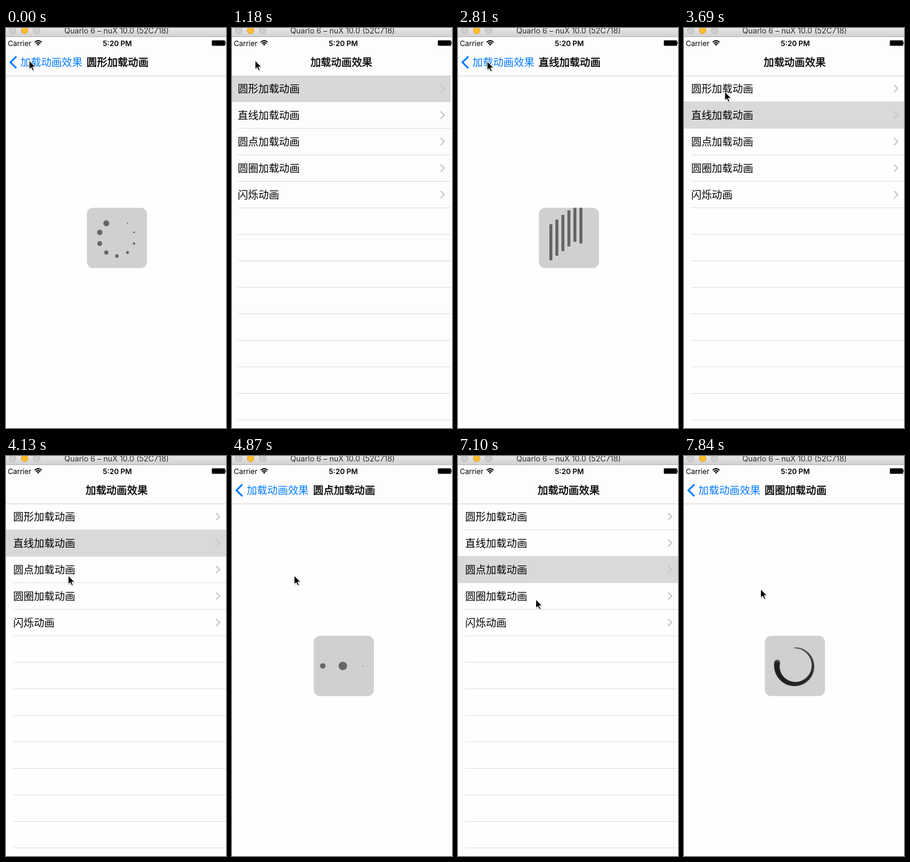
These frames come from a looping animation (366 by 664 pixels, 7990 ms). An HTML page:

```html
<!DOCTYPE html>
<html lang="zh-CN">
<head>
<meta charset="utf-8">
<title>加载动画效果</title>
<style>
  html, body { margin: 0; width: 100%; height: 100%; overflow: hidden; background: #fefefe; }
  svg { display: block; width: 100%; height: 100%; }
  text { font: 12px Inter, sans-serif; }
  .cjk { font: 17.2px "Noto Sans CJK SC", "Noto Sans CJK", sans-serif; }
  .medium { stroke: #000; stroke-width: .45; }
  .bold { font-weight: 600; }
  .blue { fill: #007aff; }
</style>
</head>
<body>
<svg viewBox="0 0 366 664">
  <defs>
    <linearGradient id="chrome" x2="0" y2="1">
      <stop stop-color="#e6e6e6"/><stop offset="1" stop-color="#d1d1d1"/>
    </linearGradient>
    <linearGradient id="edge">
      <stop stop-color="#000" stop-opacity="0"/><stop offset="1" stop-color="#000" stop-opacity=".11"/>
    </linearGradient>
    <clipPath id="cardClip"><rect x="134.5" y="298.5" width="100" height="100" rx="10"/></clipPath>
  </defs>

  <g id="list">
    <rect x="-3" y="80" width="375" height="584" fill="#fefefe"/>
    <g id="rows"></g>
    <rect id="dim" x="-3" y="80" width="375" height="584"/>
  </g>

  <g id="page">
    <rect id="shadow" x="-12" y="80" width="9" height="584" fill="url(#edge)"/>
    <rect x="-3" y="80" width="375" height="584" fill="#fefefe"/>
    <rect x="134.5" y="298.5" width="100" height="100" rx="10" fill="#d0d0d0"/>
    <g id="loaders" clip-path="url(#cardClip)" fill="#666"></g>
  </g>

  <rect y="15" width="366" height="64" fill="#fdfdfd"/>
  <path d="M0 79.5H366" stroke="#d2d2d2"/>
  <path id="back" d="M17.2 47.2L7.4 57L17.2 66.8" fill="none" stroke="#007aff" stroke-width="3"/>
  <text id="backLabel" class="cjk blue" y="63.3">加载动画效果</text>
  <text id="listTitle" class="cjk medium" y="63.3">加载动画效果</text>
  <text id="pageTitle" class="cjk medium" y="63.3"></text>

  <rect width="366" height="14" fill="url(#chrome)"/>
  <path d="M0 14.5H366" stroke="#b4b4b4"/>
  <g stroke="#b3b3b3" fill="#cfcfcf">
    <circle cx="11" cy="4" r="5.5"/>
    <circle cx="31" cy="4" r="5.5" fill="#ffbd2e" stroke="#e0a028"/>
    <circle cx="51" cy="4" r="5.5"/>
  </g>
  <text x="184" y="9" text-anchor="middle" style="font-size:12.7px" fill="#2e2e2e">Quarlo 6 – nuX 10.0 (52C718)</text>

  <text x="3" y="29.5">Carrier</text>
  <g fill="none" stroke="#000" stroke-width="1.9">
    <path d="M47.8 23.6Q53.5 18.4 59.2 23.6M49.9 26Q53.5 22.7 57.1 26"/>
    <path d="M51.4 27.1Q53.5 25.3 55.6 27.1L53.5 29.6Z" fill="#000" stroke="none"/>
  </g>
  <text class="bold" x="161" y="29.5">5:20 PM</text>
  <rect x="342.5" y="20.5" width="22" height="9" rx="1.5" stroke="#777" stroke-width=".8"/>
  <path d="M365.3 23.3h1v3.4h-1z"/>

  <g id="cursor">
    <path d="M1 2V16L4.3 13 6.6 18 9 17 6.8 12H11Z" opacity=".22"/>
    <path d="M0 0V14.5L3.3 11.4 5.6 16.6 8 15.6 5.8 10.6H10.5Z" stroke="#fff"/>
  </g>
</svg>

<script>
const LOOP = 7990, TICKS = 54, STEP = LOOP / TICKS, DT = STEP / 1000;
const $ = id => document.getElementById(id);

function add(parent, tag, attrs, text) {
  const el = document.createElementNS('http://www.w3.org/2000/svg', tag);
  set(el, attrs);
  if (text) el.textContent = text;
  return parent.appendChild(el);
}
function set(el, attrs) {
  for (const key in attrs) el.setAttribute(key, attrs[key]);
}
const repeat = (count, make) => Array.from({ length: count }, (_, i) => make(i));
const fract = x => x - Math.floor(x);

// Each page: push tick, pop tick, seconds already elapsed at each, and loader clock at push.
const pages = [
  { title: '圆形加载动画', push: 0, lead: 9, pop: 7, popLead: .145, clock: .91 },
  { title: '直线加载动画', push: 14, lead: .095, pop: 22, popLead: .1, clock: .103 },
  { title: '圆点加载动画', push: 31, lead: .095, pop: 43, popLead: .1, clock: .095 },
  { title: '圆圈加载动画', push: 49, lead: .13, pop: 99, popLead: 0, clock: .19 }
];
// tick, x, y
const cursorPath = [
  [0, 38.5, 54], [8, 38.5, 54], [12, 128.5, 147], [15, 128.5, 147], [18, 48.5, 55.5], [23, 48.5, 55.5],
  [28, 103.5, 198.5], [34, 103.5, 198.5], [38, 45, 56], [44, 45, 56], [48, 129.5, 238], [51, 129.5, 238],
  [53, 127.5, 221], [54, 127.5, 221]
];

// List rows
const rows = $('rows');
repeat(13, i => add(rows, 'path', { d: `M12 ${122.5 + 44 * i}H372`, stroke: '#dedee0' }));
const highlight = add(rows, 'rect', { x: -3, width: 375, height: 45, fill: '#d9d9d9' });
[...pages.map(p => p.title), '闪烁动画'].forEach((name, i) => {
  const y = 100.5 + 44 * i;
  add(rows, 'text', { x: 12, y: y + 6.4, class: 'cjk' }, name);
  add(rows, 'path', { d: `M349.5 ${y - 6}l6 6l-6 6`, fill: 'none', stroke: '#c7c7cc', 'stroke-width': 2 });
});

// Loaders: each returns an update function taking its clock in seconds
const groups = repeat(4, () => add($('loaders'), 'g', {}));
const ringDots = (group, count, fill) => repeat(count, i => {
  const a = i / count * 2 * Math.PI;
  return add(group, 'circle', { cx: 184.5 + 30 * Math.sin(a), cy: 348.5 - 30 * Math.cos(a), fill });
});
function shrinking(dots, radius, idle) {
  return clock => dots.forEach((dot, i) => {
    const t = clock - i / dots.length;
    set(dot, { r: radius * (t < 0 ? idle : 1 - fract(t)) });
  });
}
function bouncing(bars, rise) {
  return clock => bars.forEach((bar, i) => {
    const t = Math.max(0, clock / rise - i / bars.length) % 2;
    set(bar, { y: 338.5 - 46 * (1 - Math.abs(1 - t)) });
  });
}
const loaders = [
  shrinking(ringDots(groups[0], 10, '#666'), 5, .1),
  bouncing(repeat(6, i => add(groups[1], 'rect', { x: 152 + 10 * i, width: 5, height: 60 })), .49),
  shrinking(repeat(3, i => add(groups[2], 'circle', { cx: 149.5 + 33.3 * i, cy: 348.5 })), 7.5, .1),
  shrinking(ringDots(groups[3], 100, 'rgba(28,28,28,.59)'), 5, 0)
];

const spring = t => 1 - (1 + 19.6 * t) * Math.exp(-19.6 * t);

function cursorAt(tick) {
  const i = cursorPath.findIndex(k => k[0] > tick);
  const [t0, x0, y0] = cursorPath[i - 1], [t1, x1, y1] = cursorPath[i];
  const u = (tick - t0) / (t1 - t0), e = u * u * (3 - 2 * u);
  return `translate(${x0 + (x1 - x0) * e} ${y0 + (y1 - y0) * e})`;
}

function draw(tick) {
  const index = pages.findLastIndex(p => p.push <= tick), page = pages[index];
  const p = tick >= page.pop
    ? 1 - spring((tick - page.pop) * DT + page.popLead)
    : spring((tick - page.push) * DT + page.lead);
  const away = 1 - p, late = Math.max(0, Math.min(1, (p - .55) * 2.2));

  set($('list'), { transform: `translate(${-112.5 * p} 0)` });
  set($('dim'), { opacity: .1 * p });
  set(highlight, { y: 122 + 44 * (index - 1) });
  set($('page'), { transform: `translate(${375 * away} 0)`, visibility: p < .0015 ? 'hidden' : 'visible' });
  set($('shadow'), { opacity: Math.min(1, 1.8 * p) });

  set($('back'), { opacity: late });
  set($('backLabel'), { x: 24 + 97 * away, opacity: late });
  set($('listTitle'), { x: 132.5 - 97 * p, opacity: Math.max(0, 1 - 1.27 * p) });
  set($('pageTitle'), { x: 134 + 268 * away, opacity: p });
  $('pageTitle').textContent = page.title;

  groups.forEach((g, i) => set(g, { display: i === index ? 'inline' : 'none' }));
  loaders[index](page.clock + (tick - page.push) * DT);
  set($('cursor'), { transform: cursorAt(tick) });
}

let shown = -1;
function frame() {
  const tick = Math.floor(performance.now() % LOOP / STEP + .1) % TICKS;
  if (tick !== shown) draw(shown = tick);
  requestAnimationFrame(frame);
}
frame();
</script>
</body>
</html>
```
